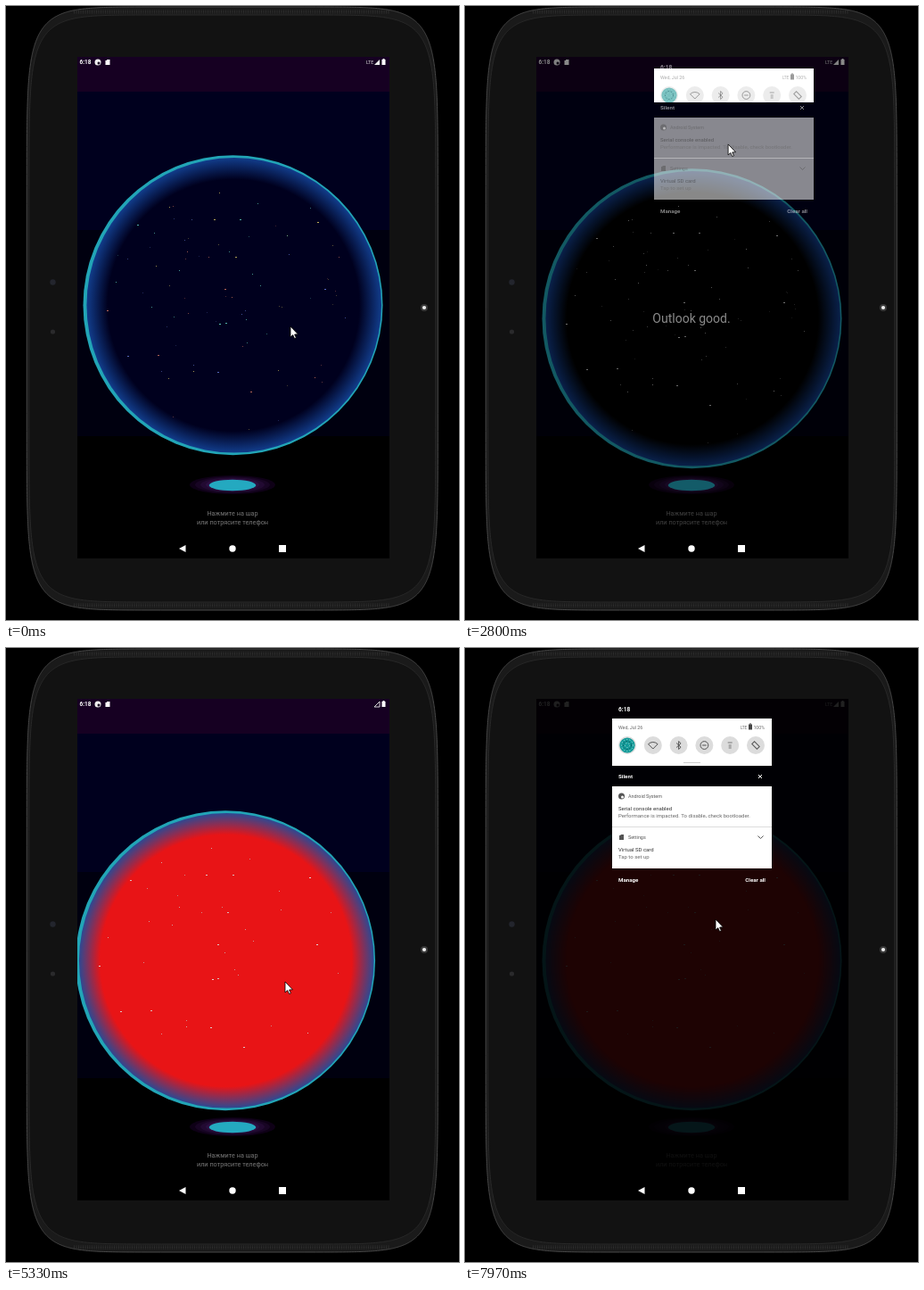
Write an HTML page with a canvas that moves like this. It is 508 by 688 pixels and loops after 8 s.

```html
<!DOCTYPE html>
<html lang="en">
<head>
<meta charset="utf-8">
<title>Answer ball</title>
<style>
html, body { margin: 0; width: 100%; height: 100%; overflow: hidden; background: #000; }
canvas { display: block; }
</style>
</head>
<body>
<canvas id="stage" width="508" height="688"></canvas>
<script>
const ctx = document.getElementById('stage').getContext('2d');
const LOOP = 8000, TAU = Math.PI * 2;
const TAPS = [1043, 4886];
const clamp = v => Math.max(0, Math.min(1, v));
const ramp = (t, a, b) => clamp((t - a) / (b - a));
const smooth = v => v * v * (3 - 2 * v);
const mix = (a, b, k) => a + (b - a) * k;
const blend = (a, b, k) => a.map((c, i) => mix(c, b[i], k));
const rgb = c => `rgb(${c.map(Math.round)})`;

function rect(x, y, w, h, fill) {
  ctx.fillStyle = fill;
  ctx.fillRect(x, y, w, h);
}
function oval(x, y, rx, ry, fill) {
  ctx.fillStyle = fill;
  ctx.beginPath();
  ctx.ellipse(x, y, rx, ry, 0, 0, TAU);
  ctx.fill();
}
const disc = (x, y, r, fill) => oval(x, y, r, r, fill);
function ring(x, y, r, color, width = 1) {
  ctx.strokeStyle = color;
  ctx.lineWidth = width;
  ctx.beginPath();
  ctx.arc(x, y, r, 0, TAU);
  ctx.stroke();
}
function shape(points, fill) {
  ctx.fillStyle = fill;
  ctx.beginPath();
  points.forEach(p => ctx.lineTo(...p));
  ctx.fill();
}
function line(points, color, width = 1) {
  ctx.strokeStyle = color;
  ctx.lineWidth = width;
  ctx.beginPath();
  points.forEach(p => ctx.lineTo(...p));
  ctx.stroke();
}
function text(s, x, y, size, fill, align = 'left', weight = 400) {
  ctx.font = `${weight} ${size}px Roboto, sans-serif`;
  ctx.textAlign = align;
  ctx.fillStyle = fill;
  ctx.fillText(s, x, y);
}

// ---- Tablet: nested superellipses ----
function shell(w, h, fill, stroke) {
  const bend = v => Math.sign(v) * Math.abs(v) ** (2 / 9);
  ctx.beginPath();
  for (let i = 0; i < 720; i++) {
    const a = i / 720 * TAU;
    ctx.lineTo(253.8 + w * bend(Math.cos(a)), 339 + h * bend(Math.sin(a)));
  }
  ctx.closePath();
  ctx.fillStyle = fill;
  ctx.fill();
  ctx.strokeStyle = stroke;
  ctx.lineWidth = 1;
  ctx.stroke();
}
function drawTablet() {
  rect(0, 0, 508, 688, '#000');
  shell(230.5, 338, '#1a1a1a', '#484848');
  shell(228, 329, '#121212', '#2a2a2a');
  ctx.setLineDash([1, 1.5]);
  for (const side of [-1, 1]) {
    for (let i = 0; i < 3; i++) {
      const y = 339 + side * (331 + i * 1.5);
      line([[76, y], [430, y]], '#383838', 0.8);
    }
  }
  ctx.setLineDash([]);
  disc(52.5, 309.5, 3.2, '#23252d');
  disc(52.5, 365, 2.6, '#2a2a2c');
  disc(469, 338, 4, '#3a3a3a');
  disc(469, 338, 2.1, '#eee');
}

// ---- Icons ----
function sdCard(x, y, fill) {
  rect(x - 2.5, y - 2, 5, 5, fill);
  rect(x - 1, y - 3, 3.5, 1, fill);
}
function systemMark(x, y, fill, hole) {
  disc(x, y, 3.5, fill);
  disc(x + 1, y + 1, 1.5, hole);
}
function signal(x, y, on, color) {
  const wedge = [[x, y], [x + 6, y], [x + 6, y - 6], [x, y]];
  if (on) shape(wedge, color);
  else line(wedge, color, 0.9);
}
function battery(x, y, color) {
  rect(x, y - 6, 4, 6, color);
  rect(x + 1, y - 7, 2, 1, color);
}
const hasLte = t => t < 3520 || t > 7700;

// Toggle icons, each drawn around its own centre.
const TOGGLES = [
  () => {
    disc(0, 0, 8.6, '#129a98');
    ctx.setLineDash([1.4, 1.8]);
    for (const r of [2.5, 4.5, 6.5]) ring(0, 0, r, r === 4.5 ? '#123f48' : '#a8e0dc', 0.8);
    ctx.setLineDash([]);
  },
  c => {
    ctx.strokeStyle = c;
    ctx.beginPath();
    ctx.moveTo(0, 4);
    ctx.arc(0, 4, 7.5, -Math.PI * 0.75, -Math.PI * 0.25);
    ctx.closePath();
    ctx.stroke();
  },
  c => line([[-2.5, -2.5], [2.5, 2.2], [0, 4.5], [0, -4.5], [2.5, -2.2], [-2.5, 2.5]], c),
  c => { ring(0, 0, 4.4, c); rect(-2.3, -0.5, 4.6, 1, c); },
  () => { rect(-1.5, -1, 3, 5, '#aaa'); rect(-2.5, -4, 5, 2, '#aaa'); },
  c => {
    ctx.rotate(-Math.PI / 4);
    ctx.strokeStyle = c;
    ctx.strokeRect(-2, -4, 4, 8);
  }
];

// ---- App ----
function drawBackdrop(t) {
  rect(80, 57, 350, 562, '#000');
  rect(80, 57, 350, 39, '#160022');
  rect(80, 96, 350, 155, '#00001e');
  rect(80, 251, 350, 231, '#00000f');
  text('6:18', 82.5, 65.3, 6.4, '#fff', 'left', 700);
  systemMark(103, 63, '#eee', '#160022');
  sdCard(114, 63, '#fff');
  if (hasLte(t)) text('LTE', 404, 65.3, 5.2, '#ddd');
  signal(413, 66, hasLte(t), '#eee');
  battery(421.5, 66, '#fff');

  for (let i = 0; i < 4; i++) {
    oval(254, 536.5, 48 - i * 6, 10.5 - i * 1.2, rgb([14 + i * 10, i * 5, 22 + i * 14]));
  }
  oval(254, 537, 26.3, 6.2, '#24a9c0');
  text('Нажмите на шар', 254, 571.3, 7.3, '#777', 'center');
  text('или потрясите телефон', 254, 581.3, 7.3, '#777', 'center');
}

let seed = 77;
const random = () => (seed = seed * 16807 % 2147483647) / 2147483647;
const HUES = [50, 175, 10, 230];
const STARS = Array.from({ length: 84 }, (_, i) => {
  const angle = random() * TAU, r = 143 * Math.sqrt(random());
  return { x: Math.cos(angle) * r, y: Math.sin(angle) * r, hue: HUES[i % 4], glow: random() };
});

// A sideways shake whose swings die away towards the end of one second.
function shakeX(t) {
  const start = TAPS.find(s => t > s && t < s + 1000);
  if (!start) return 0;
  const k = (t - start) / 1000 * 9;
  const peak = i => i < 1 || i > 8 ? 0 : (i % 2 ? 1 : -1) * (i < 5 ? 1 : 1 - 0.4 * Math.floor((i - 3) / 2));
  const i = Math.floor(k);
  return 8.5 * mix(peak(i), peak(i + 1), k - i);
}

function drawStars(x, y, lit, red) {
  for (const s of STARS) {
    if (s.glow < red * 0.5) continue;
    ctx.globalAlpha = 0.25 + 0.7 * s.glow;
    const color = `hsl(${s.hue} ${50 * (1 - lit)}% ${mix(58, 88, lit * s.glow)}%)`;
    rect(Math.round(x + s.x), Math.round(y + s.y), s.glow > 0.85 ? 2 : 1, 1, color);
  }
}
function drawBall(t) {
  const x = 254.5 + shakeX(t);
  const y = 350.3 - 15 * (1 - ramp(t, 0, 2000)) ** 2;
  const [lit, red] = TAPS.map(s => ramp(t, s, s + 150));
  const core = blend(blend([0, 0, 30], [0, 0, 0], lit), [232, 20, 22], red);
  const edge = blend([18, 62, 142], [40, 74, 150], red);

  disc(x, y, 168, '#22a5b6');
  const g = ctx.createRadialGradient(x + 0.6, y, 141, x + 1.2, y, 166);
  g.addColorStop(0, rgb(core));
  g.addColorStop(1, rgb(edge));
  disc(x + 1.2, y, 165.3, g);

  drawStars(x, y, lit, red);
  ctx.globalAlpha = ramp(t, 2050, 2400) * (1 - red);
  text('Outlook good.', x - 0.5, y + 5, 14, '#fff', 'center');
  ctx.globalAlpha = 1;
}

// ---- Notification shade ----
function drawNotice(y, app, title, detail) {
  text(app, 18, y + 13, 5.4, '#555');
  text(title, 7, y + 26.9, 6, '#333');
  text(detail, 7, y + 35.2, 6, '#666');
}
function drawNotices() {
  text('Silent', 7, 146.3, 6.2, '#fff', 'left', 700);
  line([[164, 142], [168, 146]], '#fff');
  line([[168, 142], [164, 146]], '#fff');
  rect(0, 155, 179, 92, '#fff');
  rect(0, 200, 179, 1, '#ddd');
  systemMark(10.5, 166, '#555', '#fff');
  drawNotice(155, 'Android System', 'Serial console enabled', 'Performance is impacted. To disable, check bootloader.');
  sdCard(10.5, 212, '#555');
  drawNotice(201, 'Settings', 'Virtual SD card', 'Tap to set up');
  line([[163.5, 210.5], [166.5, 213.5], [169.5, 210.5]], '#555');
  text('Manage', 7, 262, 6.2, '#fff', 'left', 700);
  text('Clear all', 172, 262, 6.2, '#fff', 'right', 700);
}
function drawQuickSettings(t) {
  text('Wed, Jul 26', 7, 91, 5.3, '#666');
  if (hasLte(t)) text('LTE', 144, 91, 4.5, '#666');
  else signal(144, 91, false, '#555');
  battery(153, 91.5, '#444');
  text('100%', 171, 91, 5.2, '#666', 'right');
  TOGGLES.forEach((icon, i) => {
    ctx.save();
    ctx.translate(17 + i * 28.8, 109);
    disc(0, 0, 10, '#dcdcdc');
    ctx.lineWidth = 1;
    icon('#555');
    ctx.restore();
  });
  rect(80, 128, 19, 1, '#ccc');
}
function drawShade(p, left, t) {
  if (p <= 0) return;
  const shown = ramp(p, 0.08, 1);
  rect(80, 57, 350, 562, `rgba(0,0,0,${0.87 * shown})`);
  ctx.save();
  ctx.translate(left, 0);
  ctx.globalAlpha = shown;
  text('6:18', 7, 71, 6.6, '#fff', 'left', 700);
  ctx.save();
  ctx.translate(0, -70 * (1 - p));
  drawNotices();
  ctx.restore();

  const top = Math.round(57 + 22 * p), height = Math.round(17 + 36 * p);
  ctx.globalAlpha = 1;
  rect(0, top, 179, height, '#fff');
  ctx.beginPath();
  ctx.rect(0, top, 179, height);
  ctx.clip();
  ctx.globalAlpha = clamp(1 - p * 4);
  systemMark(11, 67, '#555', '#fff');
  sdCard(21.5, 67, '#555');
  rect(80, 57, 19, 1, '#999');
  ctx.globalAlpha = shown;
  ctx.translate(0, top - 79);
  drawQuickSettings(t);
  ctx.restore();
}

function drawNav() {
  shape([[194, 608], [201.5, 604], [201.5, 612]], '#fff');
  disc(254, 608, 3.7, '#fff');
  rect(306, 604, 8, 8, '#fff');
}

// ---- Pointer: each move has a start, an end and a goal ----
const MOVES = [
  [1850, 2400, 304, 66], [2570, 3000, 288, 226], [3350, 3800, 255, 198], [4230, 4700, 313, 374],
  [5950, 6480, 299, 64], [6640, 6870, 294, 388], [7500, 7900, 281, 304]
];
function drawPointer(t) {
  let spot = [319, 359];
  for (const [a, b, ...goal] of MOVES) spot = blend(spot, goal, smooth(ramp(t, a, b)));
  const arrow = [[0, 0], [0, 12], [2.7, 9.6], [4.6, 13.6], [6.4, 12.8], [4.6, 9], [8.4, 8.8], [0, 0]];
  ctx.save();
  ctx.translate(...spot);
  shape(arrow, '#fff');
  line(arrow, '#000', 0.8);
  ctx.restore();
}

function draw(t) {
  drawTablet();
  ctx.save();
  ctx.beginPath();
  ctx.rect(80, 57, 350, 562);
  ctx.clip();
  drawBackdrop(t);
  drawBall(t);
  drawShade(smooth(ramp(t, 2560, 3000)) * (1 - smooth(ramp(t, 4230, 4480))), 212, t);
  drawShade(smooth(ramp(t, 6690, 7150)), 165, t);
  drawNav();
  drawPointer(t);
  ctx.restore();
}

const begin = performance.now();
function tick() {
  draw((performance.now() - begin) % LOOP);
  requestAnimationFrame(tick);
}
tick();
</script>
</body>
</html>
```
